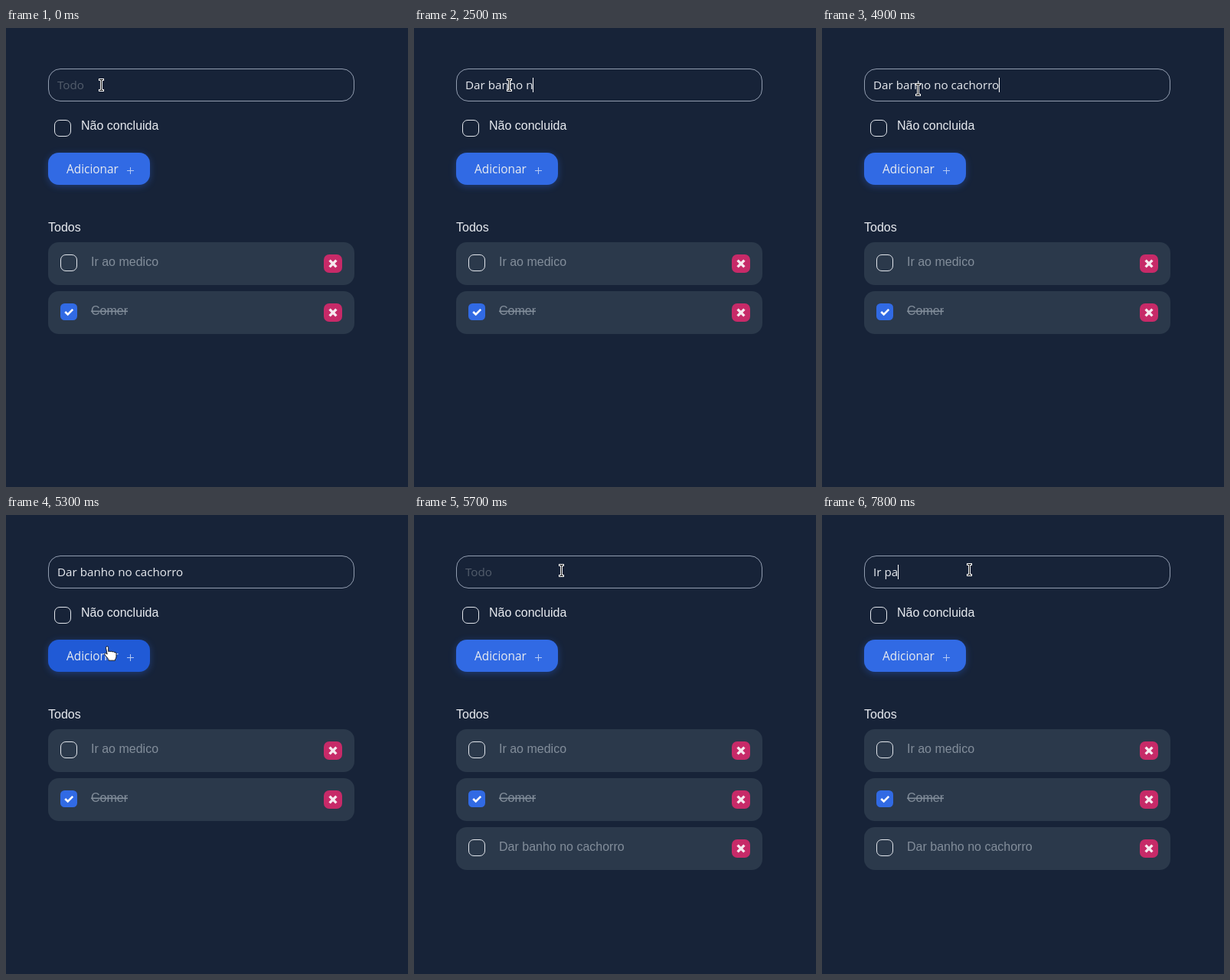
Write an HTML page that moves like this. It is 525 by 600 pixels and loops after 8 s.

```html
<!DOCTYPE html>
<html lang="pt">
<head>
<meta charset="utf-8">
<title>Todos</title>
<style>
html, body { margin: 0; width: 100%; height: 100%; overflow: hidden; background: #172338; }
svg { display: block; width: 525px; height: 600px; }
text { font: 16px "Liberation Sans", Arial, sans-serif; fill: #e8ebf0; white-space: pre; }
.ui { font: 15.2px "Open Sans", "Noto Sans", sans-serif; }
.item text { fill: #828d9a; }
.box { fill: none; stroke: #e3e7ed; }
</style>
</head>
<body>
<svg viewBox="0 0 525 600">
  <defs>
    <filter id="blur" x="-30%" y="-60%" width="160%" height="220%"><feGaussianBlur stdDeviation="5"/></filter>
    <g id="row">
      <rect x="55" y="280" width="400" height="56" rx="14" fill="#2b394b"/>
      <rect x="415" y="296" width="24" height="24" rx="7" fill="#c72a68"/>
      <path d="M422.6 303.6l8.8 8.8m0-8.8l-8.8 8.8" stroke="#f6e9ef" stroke-width="3.4"/>
    </g>
    <rect id="empty" class="box" x="71.5" y="296.5" width="21" height="21" rx="6.5"/>
  </defs>
  <rect width="525" height="600" fill="#172338"/>

  <rect x="55.5" y="53.5" width="399" height="42" rx="15.5" fill="none" stroke="#929db0"/>
  <text id="field" class="ui" x="67" y="80"></text>
  <rect id="caret" y="65" width="1" height="19" fill="#fff"/>

  <use href="#empty" x="-8" y="-176"/>
  <text x="98" y="133">Não concluida</text>

  <rect x="55" y="165" width="133" height="42" rx="14" fill="#2b5fd0" opacity=".42" filter="url(#blur)"/>
  <rect id="button" x="55" y="163" width="133" height="42" rx="14"/>
  <text class="ui" x="79" y="190" style="font-size:15.4px">Adicionar</text>
  <path d="M158 186.5h9m-4.5-4.5v9" stroke="#b4c9f4"/>

  <text x="55" y="266">Todos</text>
  <g class="item">
    <use href="#row"/><use href="#empty"/>
    <text x="111" y="311">Ir ao medico</text>
  </g>
  <g class="item">
    <use href="#row" y="64"/>
    <rect x="71" y="360" width="22" height="22" rx="5.5" fill="#316ae4"/>
    <path d="M77.2 371l3.5 3.5 6.5-6.7" fill="none" stroke="#fff" stroke-width="2.6"/>
    <text x="111" y="375" text-decoration="line-through">Comer</text>
  </g>
  <g class="item" id="added">
    <use href="#row" y="128"/><use href="#empty" y="128"/>
    <text x="111" y="439">Dar banho no cachorro</text>
  </g>

  <g id="beam">
    <path d="M-3-8h7v3h-2v11h2v3h-7v-3h2v-11h-2z" fill="#fff"/>
    <path d="M-2-6.5h5M-2 7.5h5M.5-6.5v14" stroke="#111" fill="none"/>
  </g>
  <path id="arrow" d="M0 0v16l4-3.6 2.4 5.8 2.8-1.2-2.4-5.6h5z" fill="#221d20" stroke="#fff"/>
  <path id="hand" d="M-4.5-7.5q0-1.8 1.6-1.8t1.6 1.8v5q1-1 2.6 0q1.4-.8 2.6.3q1.6-.6 2.5.6q2.6-.6 2.6 1.8v4q0 2-1.5 3.6v1.4h-8.5v-1.4l-4.8-6q-.8-1.6.5-2.1t2.4 1.4z" fill="#fff" stroke="#15181f"/>
</svg>
<script>
const LOOP = 8000;
const $ = id => document.getElementById(id);
const cursors = ["beam", "arrow", "hand"];
const phrase = "Dar banho no cachorro";

// [time, letters of the phrase typed so far]
const typing = [[0, 0], [900, 1], [1400, 2], [1500, 3], [1600, 4], [1700, 5], [1800, 7],
  [2100, 9], [2300, 10], [2500, 11], [2700, 12], [2800, 13], [2900, 14], [3200, 15],
  [3400, 16], [3600, 17], [3800, 18], [3900, 19], [4100, 20], [4200, 21]];
const later = [[5400, ""], [6500, "U"], [6700, ""], [7300, "I"], [7400, "Ir "], [7700, "Ir p"], [7800, "Ir pa"]];
const texts = [...typing.map(([t, n]) => [t, phrase.slice(0, n)]), ...later];
const carets = [[0, false], [400, true], [5200, false], [6500, true], [6700, false], [6900, true]];
const fills = [[0, "#316ae4"], [5100, "#2862de"], [5200, "#205ad6"], [5500, "#2862de"], [5600, "#316ae4"]];
const mouse = [[0, "beam", 124, 74], [4900, "beam", 125, 80], [5000, "arrow", 127, 106],
  [5100, "hand", 131, 166], [5200, "hand", 135, 179], [5300, "hand", 135, 181],
  [5400, "arrow", 162, 119], [5500, "beam", 181, 90], [5600, "beam", 190, 77],
  [5700, "beam", 192, 72], [5800, "beam", 192, 71]];

const at = (steps, t) => steps.findLast(s => s[0] <= t);
const show = (el, on) => el.style.display = on ? "" : "none";

function draw(t) {
  const text = at(texts, t)[1];
  const field = $("field");
  field.textContent = text || "Todo";
  field.style.fill = text ? "" : "#535d6c";
  const width = text ? field.getComputedTextLength() : 0;
  $("caret").setAttribute("x", Math.floor(67 + width));
  show($("caret"), at(carets, t)[1]);
  $("button").setAttribute("fill", at(fills, t)[1]);
  show($("added"), t >= 5400);
  const [, kind, x, y] = at(mouse, t);
  for (const id of cursors) show($(id), id === kind);
  $(kind).setAttribute("transform", `translate(${x} ${y})`);
}

const start = performance.now();
function tick() {
  draw((performance.now() - start) % LOOP);
  requestAnimationFrame(tick);
}
tick();
</script>
</body>
</html>
```
